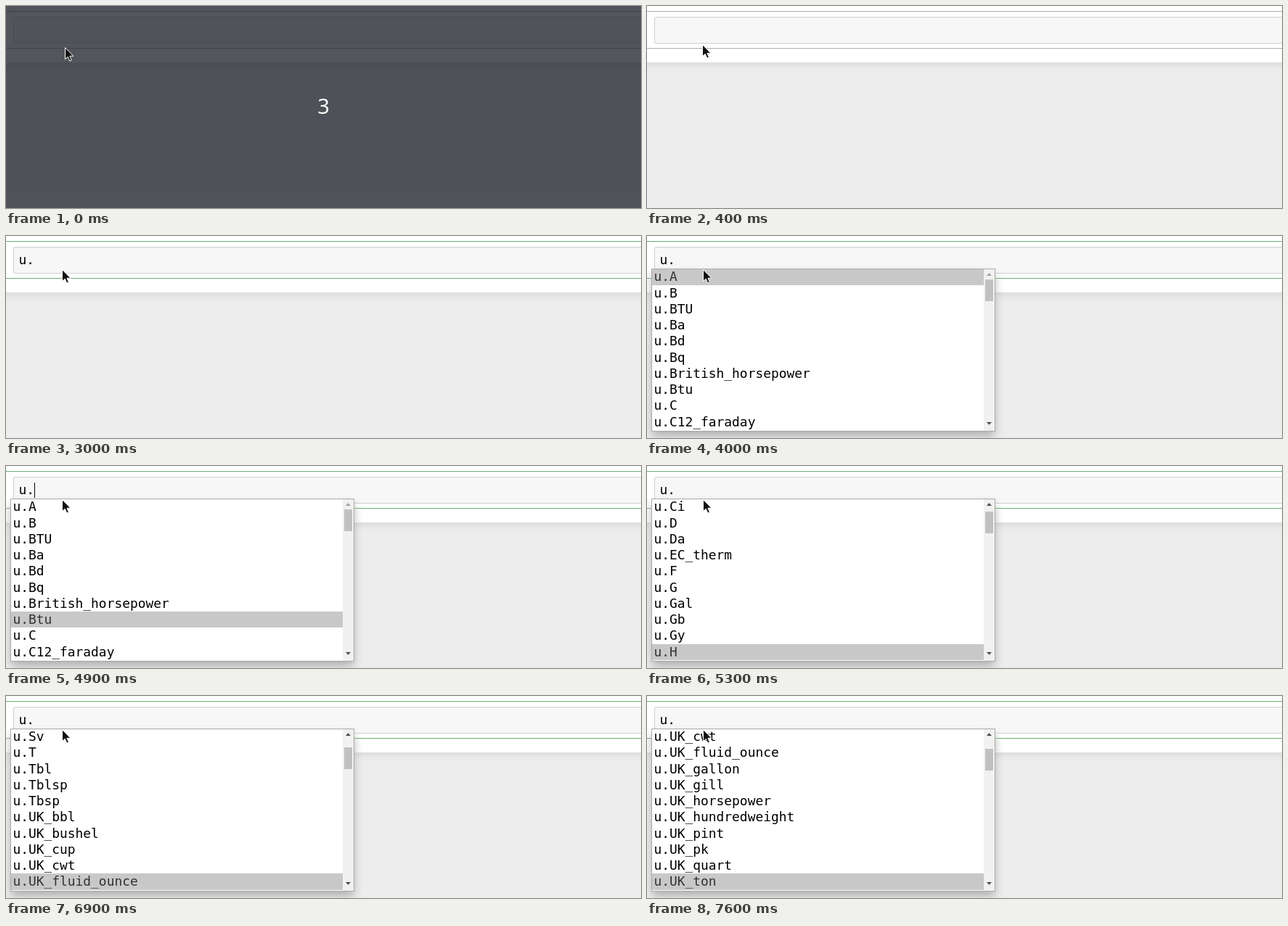
Animation, 875 px wide and 279 px high, one loop 8000 ms. Source, as an HTML page:

```html
<!DOCTYPE html>
<html>
<head>
<meta charset="utf-8">
<style>
html, body { margin: 0; width: 100%; height: 100%; overflow: hidden; background: #ededed; }
div, svg { position: absolute; box-sizing: border-box; }
#stage { width: 875px; height: 279px; overflow: hidden; font: 17.9px "DejaVu Sans Mono", monospace; color: #000; }
#page { left: -20px; top: -20px; width: 915px; height: 98px; background: #fff; box-shadow: 0 0 12px 1px rgba(87,87,87,.2); }
#cell { left: -4px; top: 7px; width: 890px; height: 52px; border: 1px solid; }
#input { left: 10px; top: 15px; width: 890px; height: 37px; border: 1px solid #cfcfcf; border-radius: 2px; background: #f7f7f7; }
#code { left: 17.6px; top: 22px; line-height: 21px; white-space: pre; }
#caret { top: 23px; width: 1px; height: 21px; background: #000; }
#popup { left: 6px; top: 45px; width: 474px; height: 225px; border: 1px solid #ababab; background: #fff; box-shadow: 0 7px 12px -1px #adadad; }
#list { left: 0; top: 0; width: 457px; height: 223px; overflow: hidden; }
#list div { left: 0; width: 457px; padding-left: 2.4px; line-height: 21px; white-space: pre; }
#list .on { background: #c8c8c8; color: #333; }
#bar { left: 457px; top: 0; width: 15px; height: 223px; background: #f1f1f1; }
#thumb { left: 2px; width: 11px; height: 30px; background: #c1c1c1; }
#count { width: 875px; height: 279px; background: rgba(35,38,47,.78); color: #fff; text-align: center; font: 29px/38px "Noto Sans", "Open Sans", sans-serif; padding-top: 119px; }
</style>
</head>
<body>
<div id="stage">
  <div id="page"></div>
  <div id="cell"></div>
  <div id="input"></div>
  <div id="code"></div>
  <div id="caret"></div>
  <div id="popup">
    <div id="list"></div>
    <div id="bar">
      <div id="thumb"></div>
      <svg width="15" height="223"><path id="up" d="M4 9h7l-3.5-4z"/><path d="M4 211h7l-3.5 4z" fill="#505050"/></svg>
    </div>
  </div>
  <div id="count">3</div>
  <svg id="mouse" width="16" height="24" viewBox="-1 -1 16 24"><path d="M.5.5V16.5l3.7-3.3 2.6 5.8 2.6-1.2-2.5-5.6h5z" fill="#111" stroke="#fff" stroke-linejoin="round"/></svg>
</div>
<script>
const $ = id => document.getElementById(id);
const units = ('A B BTU Ba Bd Bq British_horsepower Btu C C12_faraday ' +
  'Ci D Da EC_therm F G Gal Gb Gy H H2O Hg Hz J K L Mx N Nm Oe ' +
  'P PPCM PPI PSH Pa P/ Quantity R Rd S Sv T Tbl Tblsp Tbsp UK_bbl UK_bushel UK_cup UK_cwt ' +
  'UK_fluid_ounce UK_gallon UK_gill UK_horsepower UK_hundredweight UK_pint UK_pk UK_quart UK_ton').split(' ');
const rows = Array.from({ length: 10 }, () => $('list').appendChild(document.createElement('div')));

// Key points [time, value...], joined by straight lines
const mousePath = [[0, 81, 57], [200, 77, 55], [300, 77, 55], [400, 76, 53], [500, 76, 53], [900, 77, 46]];
const selection = [[0, 0], [4000, 0], [4500, 1], [4700, 2], [4900, 7], [5900, 39],
  [6200, 45], [6600, 48], [6900, 49], [7200, 56], [7500, 57]];

function tween(keys, t) {
  const i = keys.findLastIndex(k => k[0] <= t), a = keys[i], b = keys[i + 1] || a;
  const part = a === b ? 0 : (t - a[0]) / (b[0] - a[0]);
  return a.slice(1).map((v, j) => v + (b[j + 1] - v) * part);
}

const show = (id, on) => $(id).style.display = on ? '' : 'none';

function caretOn(t) {
  if (t < 2000) return t >= 900;
  if (t < 3000) return t % 600 === 500;
  return t >= 4700 && (t - 4700) % 1150 < 500;
}

function drawList(index) {
  const top = Math.max(0, index - 9);
  const rowY = i => Math.round(56.3 + i * 22.25 - top * .0015) - 57;
  rows.forEach((row, i) => {
    row.textContent = 'u.' + units[top + i];
    row.className = top + i === index ? 'on' : '';
    row.style.top = rowY(i) + 'px';
    row.style.height = rowY(i + 1) - rowY(i) + 'px';
  });
  $('thumb').style.top = 14 + Math.round(top * .27) + 'px';
  $('up').style.fill = top ? '#505050' : '#a3a3a3';
}

function draw() {
  const t = Math.floor(performance.now() % 8000 / 100) * 100;
  const [x, y] = tween(mousePath, t).map(Math.round);
  const text = t < 2400 ? '' : t < 2900 ? 'u' : 'u.';
  $('mouse').style.left = x - 1 + 'px';
  $('mouse').style.top = y - 1 + 'px';
  $('cell').style.borderColor = t < 900 ? '#ababab' : '#6aae6d';
  $('code').textContent = text;
  $('caret').style.left = Math.round(17.6 + text.length * 10.78) + 'px';
  show('caret', caretOn(t));
  show('count', t < 200);
  $('count').style.opacity = 1 - t / 200;
  show('popup', t >= 4000);
  drawList(Math.floor(tween(selection, t)[0]));
  requestAnimationFrame(draw);
}
draw();
</script>
</body>
</html>
```
